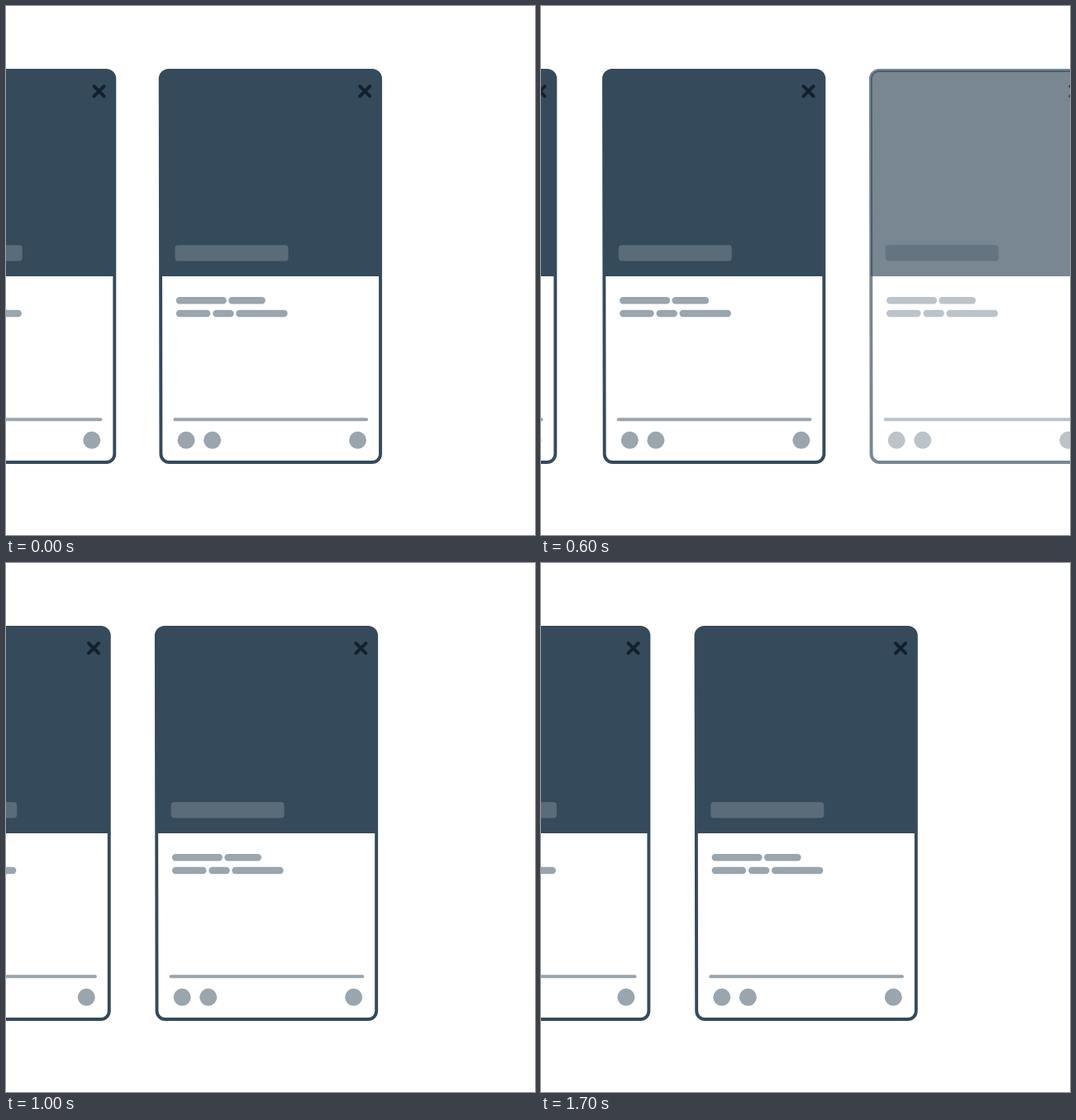
An HTML page that plays this animation: 640 by 640 pixels, repeating every 1.9 s.

```html
<!DOCTYPE html>
<html lang="en">
<head>
<meta charset="utf-8">
<title>Sliding cards</title>
<style>
  html, body { margin: 0; width: 100%; height: 100%; overflow: hidden; background: #fff; }
  svg { display: block; width: 100vw; height: 100vh; }
  .fill { fill: #354a5b; }
  .edge { fill: none; stroke: #354a5b; stroke-width: 3.9; }
  .title { fill: #5a6c79; }
  .cross { fill: none; stroke: #12212c; stroke-width: 4; stroke-linecap: round; }
  .soft { fill: #9aa5ae; }
</style>
</head>
<body>
<svg viewBox="0 0 640 640">
  <defs>
    <g id="card">
      <path class="fill" d="M1.8 327V88a10 10 0 0 1 10-10H258a10 10 0 0 1 10 10V327Z"/>
      <path class="edge" d="M1.7 88a10 10 0 0 1 10-10H258a10 10 0 0 1 10 10V542a10 10 0 0 1-10 10H12.4a10 10 0 0 1-10-10Z"/>
      <rect class="title" x="19.5" y="289.3" width="137" height="19.2" rx="4"/>
      <path class="cross" d="M243.2 97.2l12 12m0-12l-12 12"/>
      <rect class="soft" x="20.8" y="352" width="61" height="8.5" rx="4.2"/>
      <rect class="soft" x="84.2" y="352" width="44.6" height="8.5" rx="4.2"/>
      <rect class="soft" x="20.8" y="367.8" width="41.6" height="8.5" rx="4.2"/>
      <rect class="soft" x="65.2" y="367.8" width="25.4" height="8.5" rx="4.2"/>
      <rect class="soft" x="93.2" y="367.8" width="62.4" height="8.5" rx="4.2"/>
      <rect class="soft" x="17.5" y="498.2" width="235.6" height="4" rx="2"/>
      <circle class="soft" cx="33" cy="525.3" r="10.5"/>
      <circle class="soft" cx="64.6" cy="525.3" r="10.5"/>
      <circle class="soft" cx="240.5" cy="525.3" r="10.5"/>
    </g>
  </defs>
</svg>
<script>
const LOOP = 1900, STEP = 100;
const SLIDE = 400, TURN = 1400, REST = 1700;
const START_X = 507.6, PAST_X = 153, REST_X = 185.8;

const svg = document.querySelector('svg');
const template = document.getElementById('card');
const cards = [0, 1, 2].map(() => {
  const card = template.cloneNode(true);
  card.removeAttribute('id');
  svg.append(card);
  return card;
});

const clamp = v => Math.min(1, Math.max(0, v));
const mix = (a, b, p) => a + (b - a) * p;

// Cubic easing with flat ends; x1 and x2 are the handle times.
function ease(p, x1, x2) {
  let lo = 0, hi = 1;
  for (let i = 0; i < 30; i++) {
    const t = (lo + hi) / 2, u = 1 - t;
    const x = 3 * u * u * t * x1 + 3 * u * t * t * x2 + t * t * t;
    if (x < p) lo = t; else hi = t;
  }
  return lo * lo * (3 - 2 * lo);
}

function place(card, x) {
  card.setAttribute('transform', `translate(${x.toFixed(2)} 0)`);
}

function draw(ms) {
  const t = Math.floor((ms % LOOP) / STEP) * STEP;
  const slide = t <= SLIDE ? 0 : ease(clamp((t - SLIDE) / (TURN - SLIDE)), 0.332, 0.01);
  const back = t <= TURN ? 0 : ease(clamp((t - TURN) / (REST - TURN)), 0.33, 0.207);
  const x = mix(START_X, PAST_X, slide) + (REST_X - PAST_X) * back;

  place(cards[0], -136.7 - 366 * slide);
  place(cards[1], x - 322.6 - 0.8 * slide);
  place(cards[2], x);

  // Each part of the new card fades on its own, so overlaps stay visible.
  const alpha = t < SLIDE ? 0 : clamp(0.25 + 0.00205 * (t - SLIDE));
  for (const part of cards[2].children) part.setAttribute('opacity', alpha);
}

const begin = performance.now();
function tick() {
  draw(performance.now() - begin);
  requestAnimationFrame(tick);
}
tick();
</script>
</body>
</html>
```
